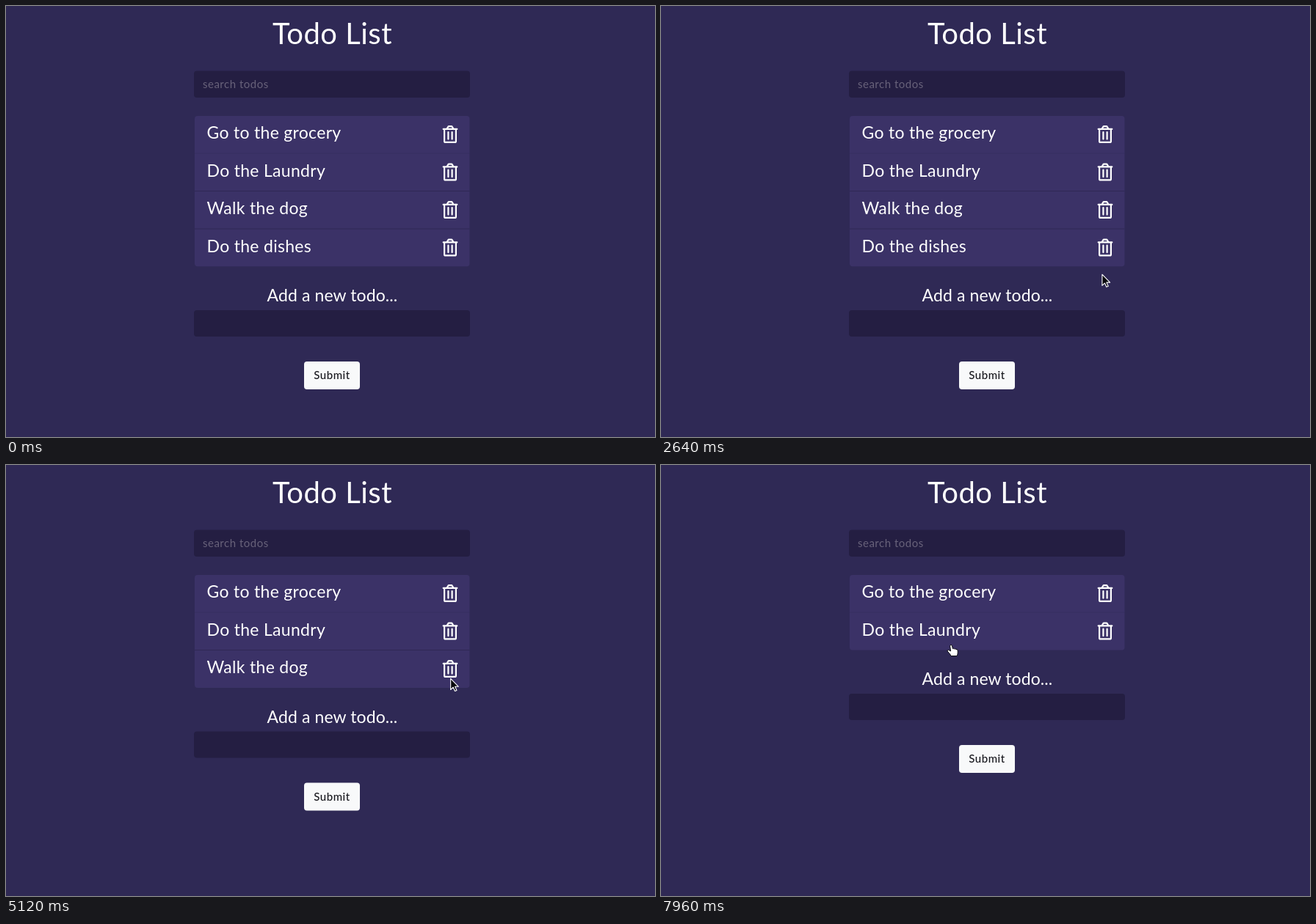
Write an HTML page that moves like this. It is 884x588 px and loops after 8 s.

```html
<!DOCTYPE html>
<html lang="en">
<head>
<meta charset="utf-8">
<title>Todo List</title>
<style>
  html, body { margin: 0; width: 100%; height: 100%; overflow: hidden; background: #2f2955; }
  svg { display: block; width: 100vw; height: 100vh; }
  text { font-family: Lato, "Open Sans", sans-serif; fill: #fff; }
  .title { font-size: 40px; letter-spacing: .5px; }
  .line { font-size: 23px; letter-spacing: .3px; }
  .small { font-size: 15px; letter-spacing: .5px; }
  .mid { text-anchor: middle; }
  .field { fill: #241e42; }
  .icon { fill: none; stroke: #fff; stroke-width: 2.2; stroke-linejoin: round; stroke-linecap: round; }
  .rule { stroke: #2f2855; stroke-width: 1; }
</style>
</head>
<body>
<svg viewBox="0 0 884 588">
  <defs>
    <g id="trash" class="icon">
      <path d="M1.2 4.9H19.8M2.6 4.9V21.4Q2.6 22.9 4.1 22.9H16.9Q18.4 22.9 18.4 21.4V4.9M6 4.9L7.6 2Q8 1.2 9 1.2H12Q13 1.2 13.4 2L15 4.9M7.9 9.2V18.6M13.1 9.2V18.6"/>
    </g>
  </defs>
  <rect width="884" height="588" fill="#2f2955"/>
  <text class="title mid" x="444.5" y="52">Todo List</text>
  <rect class="field" x="256" y="88.5" width="376" height="36.5" rx="4"/>
  <text class="small" x="268" y="111.5" style="fill:#68627a">search todos</text>
  <rect id="panel" x="257" y="150" width="374.5" rx="4" fill="#3b3267"/>
  <g id="rows"></g>
  <g id="form">
    <text class="line mid" x="444.5" y="403" style="letter-spacing:.1px">Add a new todo...</text>
    <rect class="field" x="256" y="415" width="376" height="36" rx="4"/>
    <rect x="406" y="485" width="76" height="38" rx="4" fill="#f8f9fa"/>
    <text class="small mid" x="444" y="509" style="fill:#16161c;font-weight:500">Submit</text>
  </g>
  <g id="cursor">
    <path id="arrow" d="M.5 .5V15.6L4 12.3L6.4 17.6L8.8 16.5L6.5 11.4H11.2Z" fill="#08080c" stroke="#fff" stroke-width="1.1" stroke-linejoin="round"/>
    <path id="hand" d="M-1.4 1.3Q-1.2 0 0 0Q1.2 0 1.5 1.3L2.4 5.2Q3.6 4.2 4.6 5.5Q5.8 4.7 6.8 6Q8.8 5.5 9.2 7.6V11Q9 13 8 15H0Q-1 12.6-2.6 11L-4.8 8.5Q-5.2 6.8-3.5 6.8L-.4 8.4Z" fill="#fff" stroke="#0b0b10" stroke-width="1" stroke-linejoin="round"/>
  </g>
</svg>
<script>
const LOOP = 8000, PITCH = 51.5, TOP = 150;
const items = ["Go to the grocery", "Do the Laundry", "Walk the dog", "Do the dishes"];
const removals = [3860, 6060];

// Pointer stops: time, x, y
const stops = [
  [1200, 540, 424], [1620, 596, 387.5], [2080, 596, 387.5], [3300, 606, 338],
  [4500, 606, 338], [5300, 605, 284], [6240, 605, 284], [7080, 582.3, 281.3],
  [7400, 556, 277], [7940, 395, 245.5], [8000, 395, 245.5]
];
const hiddenSpans = [[0, 1200], [5400, 6280]];

const $ = id => document.getElementById(id);
const show = (el, on) => el.setAttribute("visibility", on ? "visible" : "hidden");
const ease = p => p * p * (3 - 2 * p);

$("rows").innerHTML = items.map((label, i) => {
  const y = TOP + i * PITCH;
  const rule = i ? `<path class="rule" d="M257 ${y - .5}H631.5" opacity="${i > 1 ? 1 : .35}"/>` : "";
  return `<g>${rule}<text class="line" x="273.5" y="${y + 31}">${label}</text>` +
    `<use href="#trash" x="594.5" y="${y + 13}"/></g>`;
}).join("");
const rows = [...$("rows").children];

function pointerAt(t) {
  const i = stops.findIndex(s => s[0] > t);
  if (i < 1) return stops[0].slice(1);
  const [t0, x0, y0] = stops[i - 1], [t1, x1, y1] = stops[i];
  const p = ease((t - t0) / (t1 - t0));
  return [x0 + (x1 - x0) * p, y0 + (y1 - y0) * p];
}

function draw(now) {
  const t = now % LOOP;
  const gone = removals.filter(r => t >= r).length;
  const left = items.length - gone;
  $("panel").setAttribute("height", left * 51.3);
  rows.forEach((row, i) => show(row, i < left));
  $("form").setAttribute("transform", `translate(0 ${-gone * PITCH})`);

  const [x, y] = pointerAt(t);
  const visible = !hiddenSpans.some(([a, b]) => t >= a && t < b);
  const overRow = t > 7400 && y < 252;
  $("cursor").setAttribute("transform", `translate(${x} ${y})`);
  show($("arrow"), visible && !overRow);
  show($("hand"), visible && overRow);
}

function tick() {
  draw(performance.now());
  requestAnimationFrame(tick);
}
tick();
</script>
</body>
</html>
```
